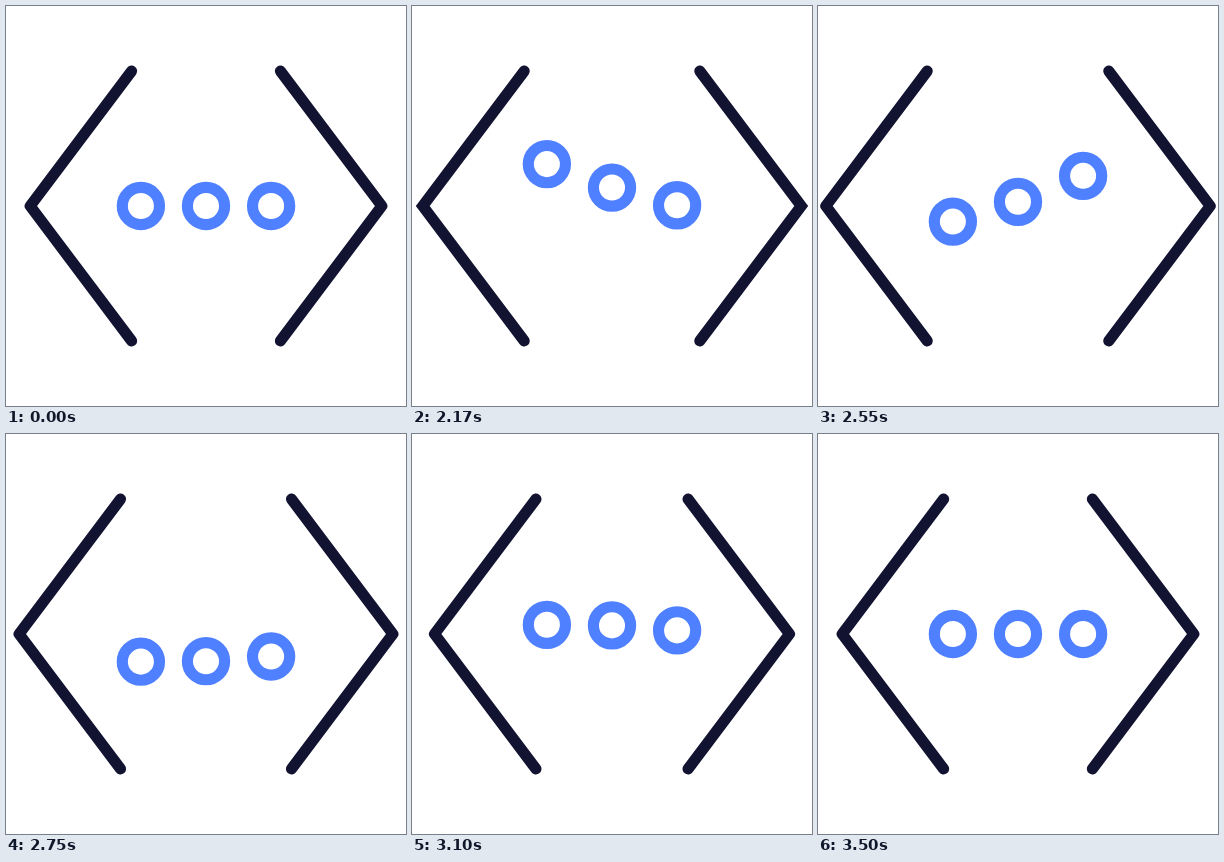
Write an HTML page that moves like this. It is 400x400 px and loops after 3.52 s.

```html
<!DOCTYPE html>
<html lang="en">
<head>
<meta charset="utf-8">
<title>Code brackets</title>
<style>
  html, body { margin: 0; height: 100%; overflow: hidden; background: #fff; }
  svg { display: block; width: 100%; height: 100%; }
  g { fill: none; stroke-width: 12; }
</style>
</head>
<body>
<svg viewBox="0 0 430 430">
  <g id="brackets" stroke="#121331" stroke-linecap="round">
    <path d="M135 70 26 215 135 360"/>
    <path d="M295 70 404 215 295 360"/>
  </g>
  <g stroke="#4f80ff">
    <circle cx="145" cy="215" r="20"/>
    <circle cx="215" cy="215" r="20"/>
    <circle cx="285" cy="215" r="20"/>
  </g>
</svg>
<script>
const LOOP = 3520, REST = 1995, STEP = 25, DOT_DELAY = 3;
const brackets = document.getElementById('brackets');
const [left, right] = brackets.children;
const dots = document.querySelectorAll('circle');

// Cubic Bézier easing with control points (x1, 0) and (x2, 1).
const bezier = (x1, x2) => x => {
  let lo = 0, hi = 1;
  for (let i = 0; i < 24; i++) {
    const t = (lo + hi) / 2, u = 1 - t;
    if (3 * u * u * t * x1 + 3 * u * t * t * x2 + t ** 3 < x) lo = t;
    else hi = t;
  }
  return lo * lo * (3 - 2 * lo);
};
const bounce = bezier(0.5, 0.35);
const open = bezier(0.333, 0.333);
const close = bezier(0.2, 0.4);

// Keys are [step, value, easing towards this key].
const spreadKeys = [[0, 0], [12, 17.6, open], [22, 17.6, open], [54, 0, close]];
const dotKeys = [[0, 0], [10, -50, bounce], [29, 30, bounce], [43, -10, bounce], [54, 0, bounce]];

function valueAt(keys, step) {
  if (step <= 0) return keys[0][1];
  const i = keys.findIndex(key => step < key[0]);
  if (i < 0) return keys.at(-1)[1];
  const [start, from] = keys[i - 1], [end, to, ease] = keys[i];
  return from + (to - from) * ease((step - start) / (end - start));
}

function draw(now) {
  const step = Math.max(0, Math.floor((now % LOOP - REST) / STEP));
  const spread = valueAt(spreadKeys, step);
  left.setAttribute('transform', `translate(${-spread})`);
  right.setAttribute('transform', `translate(${spread})`);
  brackets.setAttribute('stroke-linejoin', step > 0 && step < 22 ? 'miter' : 'round');
  dots.forEach((dot, i) => dot.setAttribute('cy', 215 + valueAt(dotKeys, step - i * DOT_DELAY)));
}

const begin = performance.now();
function tick() {
  draw(performance.now() - begin);
  requestAnimationFrame(tick);
}
tick();
</script>
</body>
</html>
```
